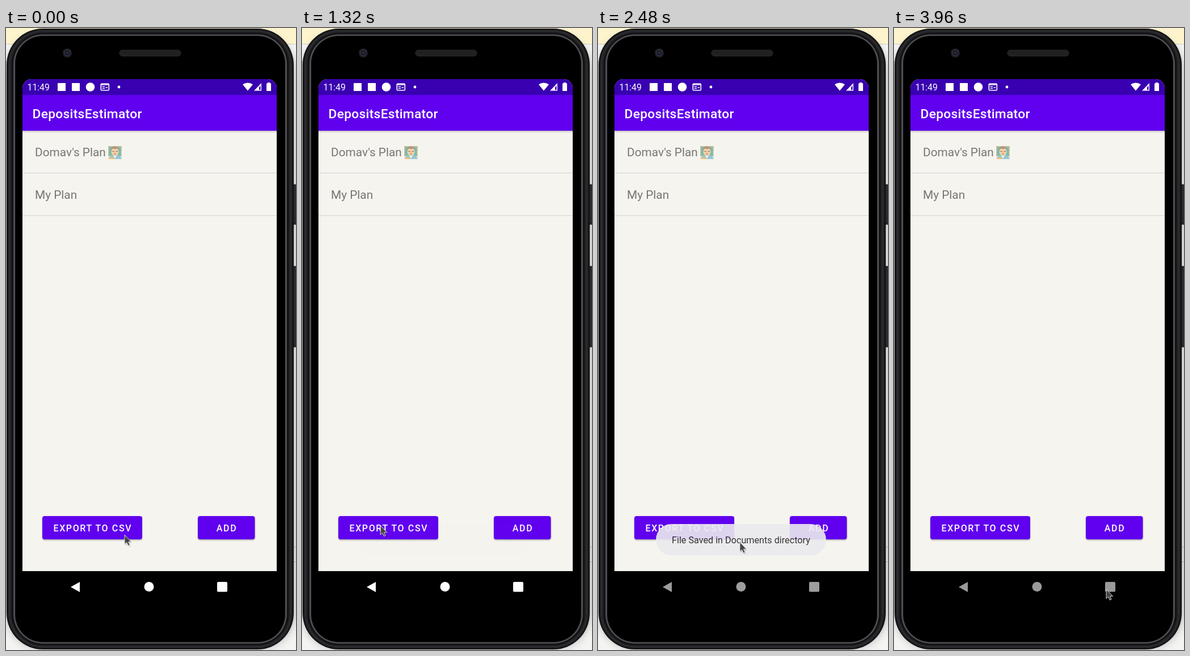
Animation, 511 px wide and 1096 px high, one loop 4000 ms. Source, as an HTML page:

```html
<!DOCTYPE html>
<html lang="en">
<head>
<meta charset="utf-8">
<title>Savings list</title>
<style>
  html, body { margin: 0; width: 100%; height: 100%; overflow: hidden; background: #f4f4f3; }
  svg { display: block; width: 511px; height: 1096px; }
  text { font-family: Roboto, sans-serif; }
  .item { font-size: 20.8px; fill: #777674; }
  .label { font-size: 16px; font-weight: 500; letter-spacing: 1.6px; fill: #fff; }
</style>
</head>
<body>
<svg viewBox="0 0 511 1096">
  <defs>
    <filter id="soft" x="-20%" y="-20%" width="140%" height="150%"><feGaussianBlur stdDeviation="1"/></filter>
    <filter id="halo" x="-10%" y="-10%" width="120%" height="120%"><feGaussianBlur stdDeviation="9"/></filter>
    <linearGradient id="barShade" x2="0" y2="1">
      <stop offset="0" stop-opacity=".2"/>
      <stop offset="1" stop-opacity="0"/>
    </linearGradient>
    <clipPath id="screen"><path d="M29 957V106a16 16 0 0 1 16-16H461a16 16 0 0 1 16 16V957Z"/></clipPath>
  </defs>

  <!-- desktop behind the phone -->
  <rect width="511" height="28" fill="#fdf3cd"/>
  <path d="M0 28.5H511M500 914.5h11M500 940.5h11" stroke="#cfccc2"/>
  <rect x="2" y="14" width="506" height="1078" rx="66" opacity=".32" filter="url(#halo)"/>

  <!-- phone body -->
  <g fill="#29292c" stroke="#111">
    <rect x="503.5" y="276" width="9" height="70" rx="2"/>
    <rect x="503.5" y="420" width="9" height="142" rx="2"/>
  </g>
  <g id="rim"></g>
  <rect x="200" y="39" width="108" height="10.5" rx="5" fill="#202021" stroke="#2c2c2d"/>
  <circle cx="108" cy="44" r="8" fill="#202024"/>
  <circle cx="108" cy="44" r="4.5" fill="#101218" stroke="#32344a" stroke-width="1.5"/>
  <circle cx="108" cy="44" r="1.5" fill="#45496c"/>

  <!-- app screen -->
  <g clip-path="url(#screen)">
    <rect x="29" y="90" width="448" height="867" fill="#f5f4ef"/>
    <rect x="29" y="90" width="448" height="28" fill="#3900b1"/>
    <rect x="29" y="118" width="448" height="63" fill="#6000ee"/>
    <rect x="29" y="181" width="448" height="4" fill="url(#barShade)"/>
    <path d="M29 255.5H477M29 330.5H477" stroke="#dddcd8" stroke-width="1.5"/>
  </g>

  <!-- status bar and title -->
  <g fill="#fff">
    <text x="37.5" y="110" font-size="15.8">11:49</text>
    <rect x="91" y="97" width="14" height="14"/>
    <rect x="116" y="97" width="14" height="14"/>
    <circle cx="148.5" cy="104" r="7.8"/>
    <rect x="167.3" y="98.3" width="14" height="11.5" rx="1" fill="none" stroke="#fff" stroke-width="1.6"/>
    <path d="M167 100h15M169.5 103.5h4.500M169.5 106.5h4.500M175.5 105h3.500" stroke="#fff" stroke-width="1.7"/>
    <circle cx="199" cy="104" r="2.4"/>
    <path d="M417 99.5Q426 93.5 435 99.5L426 110.5Z"/>
    <path fill-rule="evenodd" d="M437 110.5L450 97V110.5ZM446 104.5V109H448.5V101.5Z"/>
    <path d="M461 97.5V96H465V97.5H467V111H459V97.5Z"/>
    <text x="46.5" y="158.500" font-size="22.8" font-weight="500" letter-spacing=".28">DepositsEstimator</text>
  </g>

  <text class="item" x="51" y="226">Domav's Plan</text>
  <text class="item" x="51" y="301">My Plan</text>

  <!-- teacher emoji -->
  <g opacity=".62">
    <rect x="180.7" y="208.7" width="22.5" height="17" fill="#2f9c8c" stroke="#d1a05a" stroke-width="1.4"/>
    <path d="M181 231q1-7 8-7h6q8 0 9 7Z" fill="#5bb0c4"/>
    <path d="M189 224h6l-3 6Z" fill="#fff"/>
    <ellipse cx="192" cy="218" rx="6.5" ry="7.5" fill="#f2bd83"/>
    <path d="M185 218q-1-9.500 7-9.500t7 9.500q-1-5-3-5.500-5 1-8 0-2 1-3 5.500Z" fill="#8a5a35"/>
    <path d="M187 217.5h4M193 217.5h4M190 222h4" stroke="#70492f" stroke-width="1.3"/>
    <rect x="181" y="228" width="10" height="3" fill="#e0a03c"/>
  </g>

  <g id="buttons"></g>

  <g id="nav">
    <path d="M114 985L130 976V994Z"/>
    <circle cx="252" cy="984.5" r="8.5"/>
    <rect x="372" y="976" width="18" height="17.5" rx="2"/>
  </g>

  <g id="toast">
    <rect x="102" y="874" width="300" height="55.5" rx="27.7" fill="#ebebee"/>
    <text x="130" y="908" font-size="16.2" fill="#222">File Saved in Documents directory</text>
  </g>

  <g id="cursor">
    <path d="M1 2V18L4.500 15 7 20.500 10 19.500 7.500 14H12Z" opacity=".3" filter="url(#soft)"/>
    <path d="M0 0V16.5L3.600 13.3 6.200 19 9 17.8 6.600 12.2H11.5Z" fill="#444446" stroke="#e9e9e9" stroke-width=".9" stroke-linejoin="round"/>
  </g>
</svg>

<script>
  const LOOP = 4000;
  const byId = id => document.getElementById(id);
  const ramp = (t, from, to) => Math.min(1, Math.max(0, (t - from) / (to - from)));
  const smooth = u => u * u * (3 - 2 * u);
  const bump = (x, center, width) => Math.exp(-(((x - center) / width) ** 2));

  // Nested outlines shade the rim: a dim outer band and a bright inner edge.
  function rimLayer(inset) {
    const level = Math.round(12 + 32 * bump(inset, 5, 3.5) + 88 * bump(inset, 13, 1.3));
    const fill = inset < 16 ? `rgb(${level}, ${level}, ${level + 3})` : '#000';
    return `<rect x="${1 + inset}" y="${1 + inset * .85}" width="${506 - 2 * inset}"
      height="${1094 - 1.7 * inset}" rx="${64 - inset}" fill="${fill}"/>`;
  }
  byId('rim').innerHTML = Array.from({ length: 17 }, (_, inset) => rimLayer(inset)).join('');

  const button = (x, width, label) => `
    <rect x="${x}" y="861.5" width="${width}" height="41" rx="4" opacity=".32" filter="url(#soft)"/>
    <rect x="${x}" y="860" width="${width}" height="41" rx="4" fill="#6000ee"/>
    <text class="label" x="${x + width / 2 + .8}" y="886.5" text-anchor="middle">${label}</text>`;
  byId('buttons').innerHTML = button(64, 176, 'EXPORT TO CSV') + button(338, 100.5, 'ADD');

  // Places where the pointer turns or rests.
  const stops = [
    { t: 300, x: 209, y: 893 },
    { t: 1080, x: 138, y: 878 },
    { t: 1300, x: 138, y: 877 },
    { t: 1520, x: 146, y: 861 },
    { t: 2000, x: 161, y: 912 },
    { t: 2280, x: 170, y: 915 },
    { t: 2480, x: 250, y: 906 },
    { t: 3300, x: 369, y: 1001 },
    { t: 3960, x: 374, y: 989 }
  ];

  function pointerAt(t) {
    let { x, y } = stops[0];
    for (let i = 1; i < stops.length; i++) {
      const a = stops[i - 1], b = stops[i];
      const u = smooth(ramp(t, a.t, b.t));
      x += (b.x - a.x) * u;
      y += (b.y - a.y) * u;
    }
    return `translate(${x} ${y})`;
  }

  function draw(now) {
    const t = now % LOOP;
    const dim = 1 - Math.exp(-Math.max(0, t - 1380) / 330);
    const level = Math.round(255 - 102 * dim);
    byId('cursor').setAttribute('transform', pointerAt(t));
    byId('toast').setAttribute('opacity', .9 * (ramp(t, 1320, 1610) - ramp(t, 3480, 3840)));
    byId('nav').setAttribute('fill', `rgb(${level}, ${level}, ${level})`);
    requestAnimationFrame(draw);
  }
  draw(performance.now());
</script>
</body>
</html>
```
